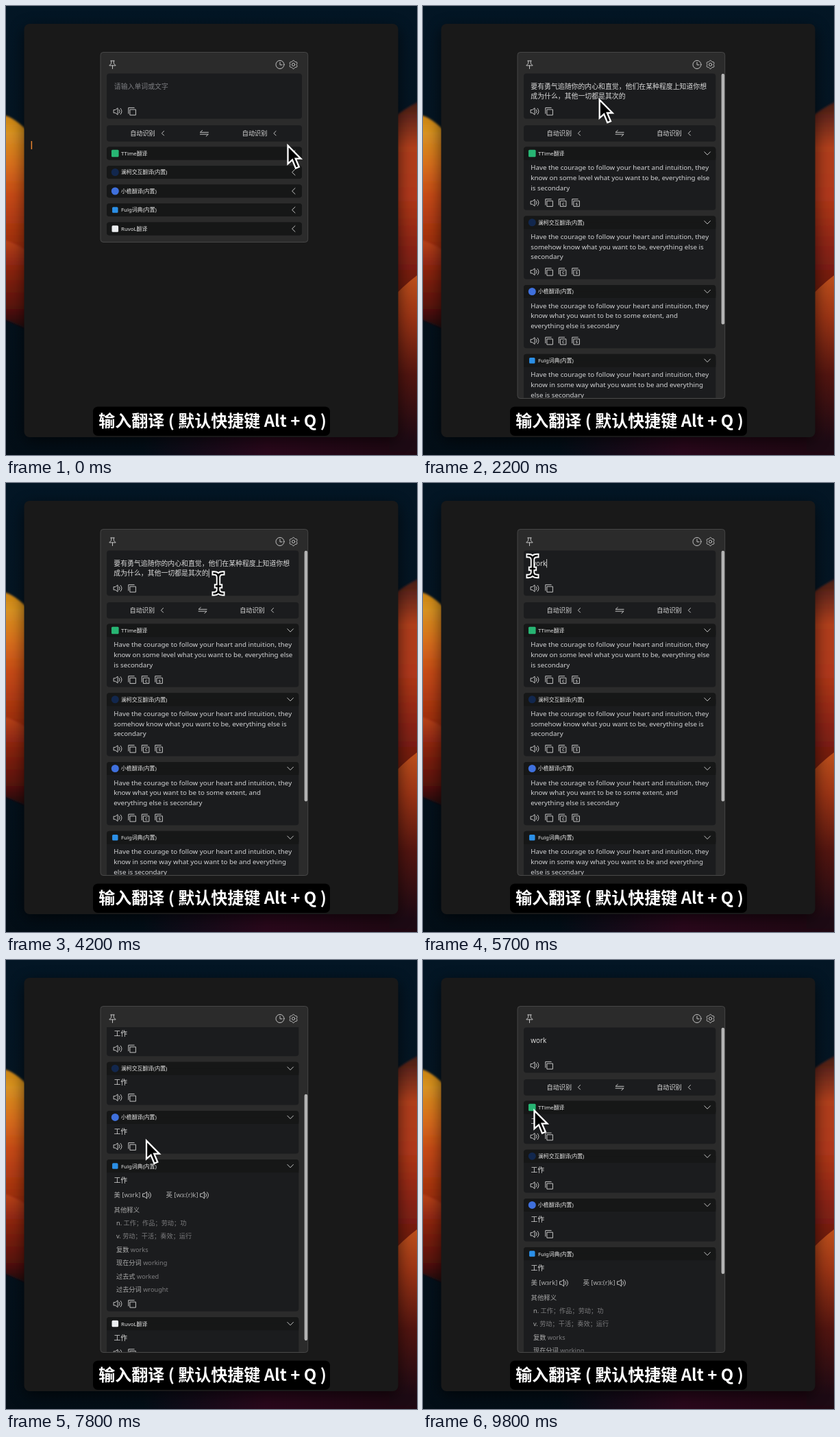
An HTML page for the animation above (9.9 s loop, 600x655 px).

```html
<!DOCTYPE html>
<html lang="zh-CN">
<head>
<meta charset="utf-8">
<title>输入翻译</title>
<style>
html, body { margin: 0; width: 100%; height: 100%; overflow: hidden; background: #04121c; }
svg { display: block; }
text { font-family: 'Noto Sans', 'Noto Sans CJK SC', 'Noto Sans CJK', sans-serif; white-space: pre; }
.cap { font: 700 24px 'Noto Sans CJK SC', 'Noto Sans CJK', sans-serif; }
.ico { fill: none; stroke: #c4c4c4; stroke-width: 1; stroke-linejoin: round; stroke-linecap: round; }
</style>
</head>
<body>
<svg id="stage" width="600" height="655" viewBox="0 0 600 655">
  <defs>
    <linearGradient id="base" x1="0" y1="0" x2="0" y2="1">
      <stop offset="0" stop-color="#031625"/><stop offset=".3" stop-color="#051522"/><stop offset="1" stop-color="#030e17"/>
    </linearGradient>
    <linearGradient id="left" gradientUnits="userSpaceOnUse" x1="0" y1="155" x2="0" y2="352">
      <stop offset="0" stop-color="#c8800f"/><stop offset=".15" stop-color="#d99320"/><stop offset=".38" stop-color="#d9701e"/>
      <stop offset=".62" stop-color="#c74a15"/><stop offset="1" stop-color="#9c2c0e"/>
    </linearGradient>
    <linearGradient id="left2" gradientUnits="userSpaceOnUse" x1="0" y1="342" x2="0" y2="468">
      <stop offset="0" stop-color="#b8421a"/><stop offset=".3" stop-color="#8f2611"/><stop offset=".75" stop-color="#5c130e"/><stop offset="1" stop-color="#260a10"/>
    </linearGradient>
    <linearGradient id="right" gradientUnits="userSpaceOnUse" x1="0" y1="135" x2="0" y2="420">
      <stop offset="0" stop-color="#3a1a18"/><stop offset=".25" stop-color="#b03f1c"/><stop offset=".5" stop-color="#b0381a"/>
      <stop offset=".8" stop-color="#842112"/><stop offset="1" stop-color="#681a10"/>
    </linearGradient>
    <linearGradient id="right2" gradientUnits="userSpaceOnUse" x1="0" y1="393" x2="0" y2="635">
      <stop offset="0" stop-color="#bd501c"/><stop offset=".25" stop-color="#9a3415"/><stop offset=".6" stop-color="#521510"/><stop offset="1" stop-color="#1d0a14"/>
    </linearGradient>
    <linearGradient id="foot" x1="0" y1="0" x2="1" y2="0">
      <stop offset="0" stop-color="#2b081c" stop-opacity="0"/><stop offset=".45" stop-color="#2b081c"/><stop offset="1" stop-color="#1f0812"/>
    </linearGradient>
    <filter id="soft" x="-50%" y="-10%" width="200%" height="120%"><feGaussianBlur stdDeviation="1.8"/></filter>
    <filter id="shade" x="-10%" y="-10%" width="120%" height="120%"><feGaussianBlur stdDeviation="11"/></filter>
  </defs>
  <rect width="600" height="655" fill="url(#base)"/>
  <rect x="200" y="625" width="400" height="30" fill="url(#foot)"/>
  <path d="M-20 155L0 160Q18 166 40 192V400H-20Z" fill="url(#left)" filter="url(#soft)"/>
  <path d="M-20 338L0 342Q14 346 40 363V475L0 458L-20 452Z" fill="url(#left2)" filter="url(#soft)"/>
  <path d="M560 168Q585 145 620 132V430H560Z" fill="url(#right)" filter="url(#soft)"/>
  <path d="M560 430Q580 408 600 393V650H560Z" fill="url(#right2)"/>
  <rect x="26" y="32" width="547" height="603" rx="10" fill="#000" opacity=".6" filter="url(#shade)"/>
  <rect x="26.5" y="26" width="546" height="603" rx="8" fill="#191919"/>
  <rect id="edit" x="36.6" y="197" width="1.5" height="12" fill="#e5832f"/>
  <g id="panel"></g>
  <rect x="127" y="584.5" width="346" height="42.5" rx="7" fill="#000"/>
  <text class="cap" x="135.3" y="613.5" fill="#fff">输入翻译 ( 默认快捷键 Alt + Q )</text>
  <g id="arrow">
    <path d="M.5 2.6V29.2L7 23.4L12 35.7L16.8 33.7L11.7 21.7H19.4Z" fill="#000" stroke="#fff" stroke-width="2.3"/>
  </g>
  <g id="beam" fill="none">
    <path id="beamOut" stroke="#fff" stroke-width="6.4" stroke-linecap="square"/>
    <path id="beamIn" stroke="#000" stroke-width="2.6" stroke-linecap="square"/>
  </g>
</svg>
<script>
const LOOP = 9900, STEP = 100, VIEW_TOP = 98, MAX_BOTTOM = 572.5;
const HEAD = 19, GAP = 8.5, LONG = 73.25, SHORT = 43.7, DICT = 202.5;
const $ = id => document.getElementById(id);

const quote = '要有勇气追随你的内心和直觉，他们在某种程度上知道你想成为什么，其他一切都是其次的';
const first = 'Have the courage to follow your heart and intuition, they';
const services = [
  { name: 'TTime翻译', color: '#27b573', box: 1, lines: ['know on some level what you want to be, everything else', 'is secondary'], at: [800, 6350] },
  { name: '澜柯交互翻译(内置)', color: '#12274d', lines: ['somehow know what you want to be, everything else is', 'secondary'], at: [1128, 6450] },
  { name: '小檐翻译(内置)', color: '#3f70dc', lines: ['know what you want to be to some extent, and', 'everything else is secondary'], at: [1153, 6500] },
  { name: 'Fulg词典(内置)', color: '#2b8fe6', box: .8, dict: true, lines: ['know in some way what you want to be and everything', 'else is secondary'], at: [1450, 6700] },
  { name: 'RuvoL翻译', color: '#eceef0', box: .9, lines: ['know to some extent what you want to be, and everything', 'else is secondary'], at: [1700, 6800] }
];
const forms = [['n.', '工作；作品；劳动；功'], ['v.', '劳动；干活；奏效；运行'], ['复数', 'works'],
  ['现在分词', 'working'], ['过去式', 'worked'], ['过去分词', 'wrought']];

const clamp = v => Math.max(0, Math.min(1, v));
const ease = v => { v = clamp(v); return v * v * (3 - 2 * v); };
const ramp = (t, a, b) => ease((t - a) / (b - a));

// Keys are [time, ...values]
function track(keys, t) {
  let i = 0;
  while (i < keys.length - 2 && t >= keys[i + 1][0]) i++;
  const [a, b] = [keys[i], keys[i + 1]], p = ramp(t, a[0], b[0]);
  return a.slice(1).map((v, k) => v + (b[k + 1] - v) * p);
}
const pointer = [[0, 411, 201], [300, 411, 201], [1100, 248, 134], [2000, 248, 134], [2800, 307, 136], [3500, 307, 136],
  [4100, 310, 146.5], [4500, 310, 146.5], [5100, 160, 121], [6500, 160, 121], [7200, 204.5, 261], [9100, 204.5, 261], [9700, 162, 217]];
const scrolling = [[0, 0], [7300, 0], [7800, 128], [8200, 128], [8900, 0]];

const text = (x, y, s, size, fill, weight = 400) =>
  `<text x="${x}" y="${y}" font-size="${size}" font-weight="${weight}" fill="${fill}">${s}</text>`;
const rect = (x, y, w, h, r, fill) => `<rect x="${x}" y="${y}" width="${w}" height="${h}" rx="${r}" fill="${fill}"/>`;
const icon = (x, y, d, extra = '') => `<g class="ico" transform="translate(${x} ${y})"><path d="${d}"/>${extra}</g>`;
const crop = (x, y, w, h, body) => `<svg x="${x}" y="${y}" width="${w}" height="${h}" viewBox="${x} ${y} ${w} ${h}" overflow="hidden">${body}</svg>`;

const speaker = (x, y) => icon(x, y, 'M-6 -2.2H-3.8L-.4 -4.9V4.9L-3.8 2.2H-6ZM1.8 -2.4Q3.6 0 1.8 2.4M3.7 -4.3Q7.4 0 3.7 4.3');
const copy = (x, y, mark = '') => icon(x, y, 'M-5.2 3.2V-5.3H3.2M-2.7 -2.7H5.4V5.4H-2.7Z') +
  (mark && `<text x="${x + 1.35}" y="${y + 3.5}" font-size="5.8" font-weight="700" text-anchor="middle" fill="#c4c4c4">${mark}</text>`);
const chevron = (x, y, open) => icon(x, y, open ? 'M-4.3 -2.2L0 2.2L4.3 -2.2' : 'M2.2 -4.3L-2.2 0L2.2 4.3');
const arrowhead = x => icon(x, 185.7, 'M1.6 -3.2L-1.6 0L1.6 3.2');
const gear = 'M' + Array.from({ length: 36 }, (_, i) => {
  const a = i * Math.PI / 18, r = 5.4 + .7 * Math.cos(6 * a);
  return (r * Math.sin(a)).toFixed(2) + ' ' + (r * Math.cos(a)).toFixed(2);
}).join('L') + 'Z';

function logo(s, y) {
  if (!s.box) return `<circle cx="159.3" cy="${y}" r="5.5" fill="${s.color}"/>`;
  const w = 10.6 * s.box;
  return rect(159.3 - w / 2, y - w / 2, w, w, 1.6, s.color);
}

const glyphWidth = ch => /[()]/.test(ch) ? .3 : /\w/.test(ch) ? .55 : 1;
function dots(s, y, t) {
  const end = 168 + 7.85 * [...s.name].reduce((sum, ch) => sum + glyphWidth(ch), 0);
  return [0, 1, 2].map(i => {
    const pulse = .5 + .5 * Math.cos(t / 140 - i * .8 - 9.3);
    return `<circle cx="${end + 6 + i * 4.8}" cy="${y}" r="${(.8 + .5 * pulse).toFixed(2)}" fill="#8d8d8d"/>`;
  }).join('');
}

function dictBody(c) {
  return text(157.5, c + 45.5, '美 [wɜrk]', 9.4, '#b0b0b0') + speaker(206, c + 42.5) +
    text(233.5, c + 45.5, '英 [wɜ:(r)k]', 9.4, '#b0b0b0') + speaker(290, c + 42.5) +
    text(157.5, c + 67, '其他释义', 9.4, '#a4a4a4') +
    forms.map(([k, v], i) => `<text x="161" y="${c + 86.3 + i * 19.4}" font-size="9.2" fill="#acacac">${k} <tspan fill="#7c7c7e">${v}</tspan></text>`).join('');
}

function cardBody(s, c, word) {
  if (!word) {
    return [first, ...s.lines].map((l, i) => text(157.3, c + 24 + i * 14.75, l, 9.78, '#d3d4d6')).join('') +
      speaker(163.5, c + 72) + copy(184, c + 72) + copy(203.5, c + 72, 'C') + copy(223, c + 72, 'S');
  }
  const y = c + (s.dict ? 201 : 42.5);
  return text(157.5, c + 24.2, '工作', 9.8, '#dadada') + (s.dict ? dictBody(c) : '') + speaker(163.5, y) + copy(184, y);
}

function layout(t) {
  const word = t >= 6300;
  let c = 215;
  const cards = services.map(s => {
    const full = !word ? LONG : s.dict ? DICT : SHORT;
    const start = s.at[word ? 1 : 0];
    const open = ramp(t, start, start + 300) * (word ? 1 : 1 - ramp(t, 6000, 6300));
    const expanded = t >= start && (word || t < 6000);
    const card = { s, c, h: full * open, expanded, waiting: !expanded && t >= 500 };
    c += HEAD + GAP + card.h;
    return card;
  });
  return { cards, word, end: c - GAP + 0.5 };
}

function inputBox(t, width) {
  let lines = [];
  if (t >= 5300) lines = ['work'.slice(0, t >= 5600 ? 4 : t >= 5500 ? 3 : t >= 5400 ? 2 : 1)];
  else if (t >= 500) {
    const n = width < 285 ? 26 : 27;
    lines = [quote.slice(0, n), quote.slice(n)];
  }
  let out = rect(147, 98.5, width, 66, 4, '#1b1c1e');
  out += lines.length ? lines.map((l, i) => text(157.3, 120.6 + i * 14.8, l, 9.88, '#dadada')).join('')
    : text(157.8, 120.6, '请输入单词或文字', 9.88, '#7c7d81');
  const typing = t >= 5300 && t < 6000;
  const blink = t >= 3700 && t < 5300 && (t - 3700) % 1000 < 600;
  if (typing) out += rect(157.6 + [7.8, 13.7, 17.7, 22.6][lines[0].length - 1], 111, .9, 12.5, 0, '#d0d0d0');
  else if (blink) out += rect(295.8, 125.5, .9, 12.5, 0, '#d0d0d0');
  return out + speaker(163.5, 153.7) + copy(184, 153.7);
}

function panel(t) {
  const { cards, word, end } = layout(t);
  const bottom = Math.min(end, MAX_BOTTOM), scrolls = end > MAX_BOTTOM;
  const width = scrolls ? 280.3 : 285, right = 147 + width;
  const view = bottom - VIEW_TOP - .8;
  const scroll = scrolls ? Math.min(track(scrolling, t)[0], end - MAX_BOTTOM) : 0;
  const slip = scrolls ? 1 : 0;

  let body = inputBox(t, width) + rect(147, 174, width, 23.7, 4, '#1b1c1e') +
    text(181.2 - .7 * slip, 189.2, '自动识别', 9.15, '#dadada') + arrowhead(229 - slip) +
    icon(289.4 - 2.3 * slip, 185.6, 'M6 -1.3H-6L-2.8 -4.2M-6 1.5H6L2.8 4.4') +
    text(344.8 - 3.6 * slip, 189.2, '自动识别', 9.15, '#dadada') + arrowhead(392.5 - 3.6 * slip);

  for (const { s, c, h, expanded, waiting } of cards) {
    const top = c - HEAD / 2;
    body += rect(147, top, width, HEAD + h, 4, '#1b1c1e') + rect(147, top, width, HEAD, 4, '#161717');
    if (h > 4) body += rect(147, c, width, HEAD / 2, 0, '#161717') + crop(147, c + HEAD / 2, width, h, cardBody(s, c, word));
    body += logo(s, c) + text(168, c + 2.9, s.name, 7.85, '#e6e6e6', 500) + chevron(right - 12.2, c, expanded);
    if (waiting) body += dots(s, c, t);
  }

  let out = `<rect x="138" y="67.5" width="302.7" height="${bottom - 67.5}" rx="4" fill="#2b2b2b" stroke="#474747" stroke-width="1"/>` +
    icon(155.5, 85.5, 'M-2.7 -5.5H2.7M-1.8 -5.5V-1.6L-4.7 1.4H4.7L1.8 -1.6V-5.5M0 1.4V6') +
    icon(400, 85.5, 'M0 -3.4V.4H3.2', '<circle r="6"/>') + icon(419.6, 85.5, gear, '<circle r="2.1"/>') +
    crop(139, VIEW_TOP, 301, view, `<g transform="translate(0 ${-scroll})">${body}</g>`);
  if (scrolls) {
    const scale = 473 / (end - VIEW_TOP);
    out += rect(435.6, 98.7 + scroll * scale, 4.6, 474 * scale, 2.3, '#b3b3b3');
  }
  return out;
}

function render(t) {
  $('panel').innerHTML = panel(t);
  $('edit').style.display = t < 500 ? '' : 'none';
  const [x, y] = track(pointer, t), overText = t >= 2300 && t < 6600;
  $('arrow').style.display = overText ? 'none' : '';
  $('beam').style.display = overText ? '' : 'none';
  $(overText ? 'beam' : 'arrow').setAttribute('transform', `translate(${x} ${y})`);
}

const beamPath = 'M-6.3 -15Q0 -15 0 -9V9Q0 15 -6.3 15M6.3 -15Q0 -15 0 -9M0 9Q0 15 6.3 15M-3 4H3';
$('beamOut').setAttribute('d', beamPath);
$('beamIn').setAttribute('d', beamPath);

const begin = performance.now();
let shown = -1;
function tick() {
  const t = Math.floor(((performance.now() - begin) % LOOP) / STEP) * STEP;
  if (t !== shown) render(shown = t);
  requestAnimationFrame(tick);
}
tick();
</script>
</body>
</html>
```
